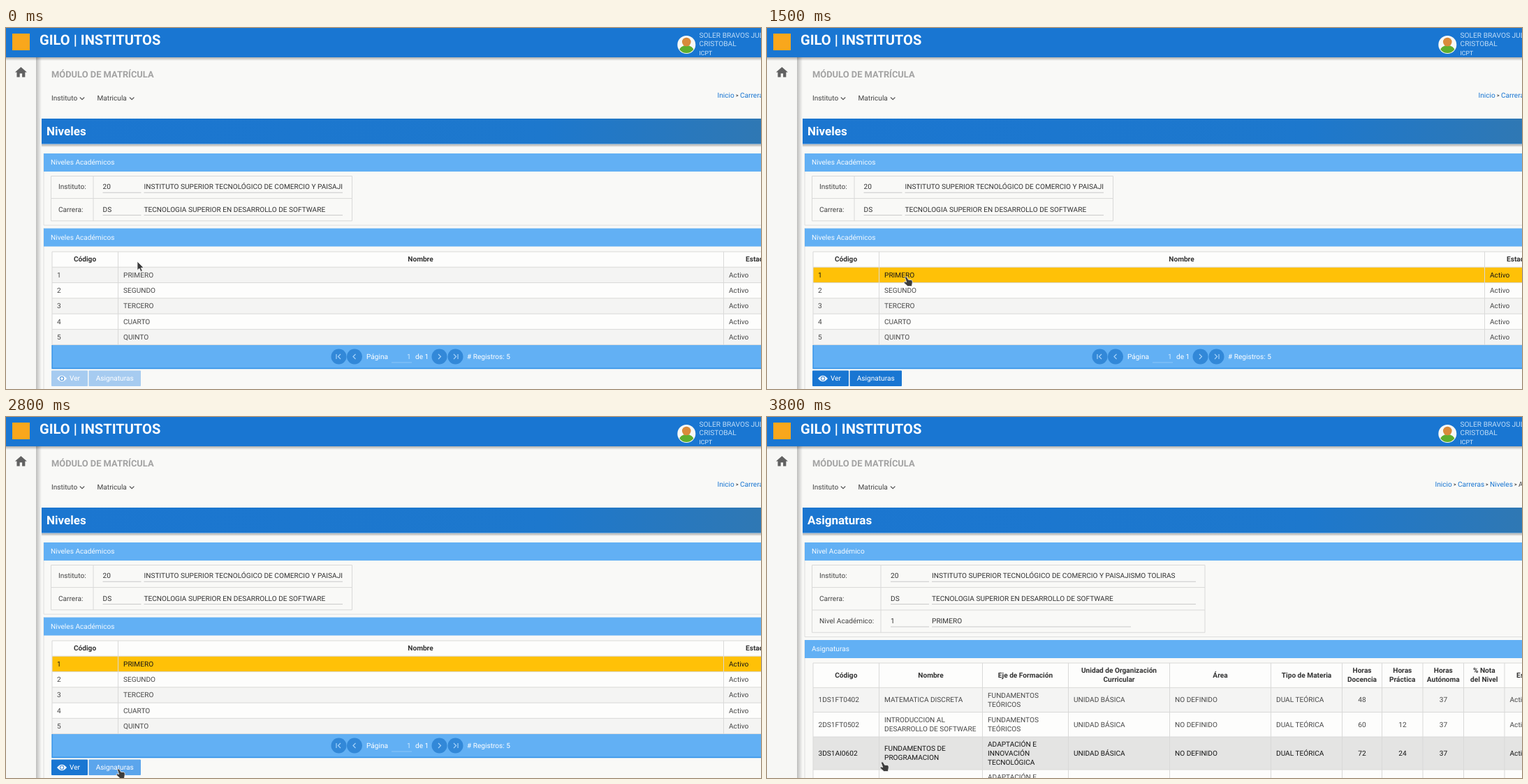
Animation, 1081 px wide and 518 px high, one loop 3.9 s. Source, as an HTML page:

```html
<!DOCTYPE html>
<html lang="es">
<head>
<meta charset="utf-8">
<title>Módulo de matrícula</title>
<style>
  html, body { margin: 0; width: 100%; height: 100%; overflow: hidden; background: #f9f9f7; }
  svg { display: block; width: 100%; height: 100%; }
  text { font-family: Roboto, Arial, sans-serif; text-rendering: geometricPrecision; white-space: pre; }
  .row text { fill: #484848; }
  .row.hover rect { fill: #e4e4e3; }
  .row.hover text, .row.picked text { fill: #151515; }
  .row.picked rect { fill: #ffc107; }
</style>
</head>
<body>
<svg id="stage" viewBox="0 0 1081 518" xmlns="http://www.w3.org/2000/svg"></svg>
<script>
const LOOP = 3900, STEP = 100, PAGE_AT = 2900, PICK_AT = 700;
const INK = '#424242', LINE = '#d9d9d8', BLUE = '#1976d2', SKY = '#62b0f4';
const SCHOOL = 'INSTITUTO SUPERIOR TECNOLÓGICO DE COMERCIO Y PAISAJISMO TOLIRAS';
const CAREER = 'TECNOLOGIA SUPERIOR EN DESARROLLO DE SOFTWARE';

// y is the middle of the capital letters
const text = (s, x, y, { size = 10.12, fill = INK, weight = 400, anchor = 'start' } = {}) =>
  `<text x="${x}" y="${y + size * 0.355}" font-size="${size}" fill="${fill}" font-weight="${weight}" text-anchor="${anchor}">${s}</text>`;
const rect = (x, y, w, h, fill, extra = '') =>
  `<rect x="${x}" y="${y}" width="${w}" height="${h}" fill="${fill}" ${extra}/>`;
const path = (d, stroke, width = 1, extra = '') =>
  `<path d="${d}" fill="none" stroke="${stroke}" stroke-width="${width}" ${extra}/>`;
const hline = (x1, x2, y, c = LINE) => path(`M${x1} ${y}H${x2}`, c);
const vline = (x, y1, y2, c = LINE) => path(`M${x} ${y1}V${y2}`, c);
const group = (id, body, extra = '') => `<g id="${id}" ${extra}>${body}</g>`;

const defs = `<defs>
  <linearGradient id="bar"><stop offset="0" stop-color="#1b76d0"/><stop offset=".7" stop-color="#1d78cd"/><stop offset="1" stop-color="#2f78b4"/></linearGradient>
  <linearGradient id="down" x2="0" y2="1"><stop offset="0" stop-opacity=".3"/><stop offset="1" stop-opacity="0"/></linearGradient>
  <linearGradient id="right"><stop offset="0" stop-opacity=".24"/><stop offset="1" stop-opacity="0"/></linearGradient>
  <clipPath id="face"><circle cx="974.3" cy="24" r="12"/></clipPath>
</defs>`;

const heading = (s, y) => rect(54, y, 1027, 26, SKY) + text(s, 64, y + 12.5, { fill: '#f4faff' });

function frameParts() {
  const chevron = x => path(`M${x} 99.5l3.2 3.2 3.2-3.2`, '#555', 1.1);
  return rect(0, 0, 1081, 518, '#f9f9f7')
    + rect(0, 42, 43, 476, '#f7f7f5') + rect(43, 42, 8, 476, 'url(#right)')
    + rect(0, 42, 1081, 5, 'url(#down)') + rect(0, 0, 1081, 42, BLUE)
    + text('GILO | INSTITUTOS', 48, 17, { size: 20.1, fill: '#fff', weight: 700 })
    + '<path transform="translate(11.2 53.4) scale(.85)" fill="#616161" d="M10 20v-6h4v6h5v-8h3L12 3 2 12h3v8z"/>'
    + text('MÓDULO DE MATRÍCULA', 65, 66.5, { size: 12.9, fill: '#a3a3a3', weight: 700 })
    + text('Instituto', 65, 100) + chevron(105.8) + text('Matricula', 130.5, 100) + chevron(177)
    + rect(51, 167, 1030, 4, 'url(#down)') + rect(51, 130, 1030, 36.5, 'url(#bar)');
}

function account() {
  const small = { size: 10.2, fill: '#bfdcf7' };
  return rect(9, 8, 25, 24, '#f9a71c')
    + '<circle cx="974.3" cy="24" r="13" fill="#f7f8f5"/><g clip-path="url(#face)">'
    + '<ellipse cx="974.3" cy="33" rx="10.5" ry="8" fill="#5fae2e"/><circle cx="974.3" cy="20" r="6.3" fill="#d98a3a"/></g>'
    + text('SOLER BRAVOS JULIO', 992.5, 10, small) + text('CRISTOBAL', 992.5, 22.8, small)
    + text('ICPT', 992.5, 35.5, { size: 8.7, fill: '#d5e8fa' });
}

function crumbs(items) {
  return items.map(([s, x, sep], i) => text(s, x, 96.5, { fill: s === 'Asignaturas' ? INK : BLUE })
    + (sep ? text('&gt;', sep, 97, { size: 7, weight: 700 }) : '')).join('');
}

// label / code / value form with thin underlines
function form(right, split, col, rows) {
  const bottom = 212 + rows.length * 32.4;
  let out = path(`M64.5 212.5H${right}V${bottom}H64.5Z`, LINE) + vline(split, 212, bottom);
  rows.forEach(([label, code, value, end], i) => {
    const y = 227.8 + i * 32.4;
    if (i) out += hline(64.5, right, 212.2 + i * 32.4);
    out += text(label, 75, y) + text(code, col, y, { fill: '#333' }) + text(value, col + 59, y, { fill: '#333' })
      + hline(col, col + 55, y + 8.4, '#c9c9c9') + hline(col + 59, end, y + 8.4, '#c9c9c9');
  });
  return out;
}

function row(y, h, odd, cells) {
  const body = cells.map(([s, x, anchor]) => {
    const lines = s.split('|');
    return lines.map((l, i) => text(l, x, y + h / 2 + (i - (lines.length - 1) / 2) * 13 - .3, { fill: '', anchor })).join('');
  }).join('');
  return `<g class="row" data-y="${y}" data-h="${h}">${rect(66, y, 1015, h, odd ? '#f4f4f3' : '#fdfdfc')}${body}</g>`;
}

function grid(cols, ys) {
  return cols.map(x => vline(x, ys[0], ys[ys.length - 1])).join('') + ys.map(y => hline(66, 1081, y)).join('');
}

const bold = { weight: 700, anchor: 'middle', fill: '#333' };

function pager() {
  const disc = (x, d) => `<circle cx="${x}" cy="471.5" r="11" fill="#3288d8"/>` + path(`M${x} 471.5${d}`, '#a5d2fa', 1.2);
  const white = { fill: '#fff' };
  return rect(66, 455, 1015, 34, SKY) + path('M66 455V488.5H1081', '#2f8fe6', 1.3)
    + disc(476.5, 'm2.5-3.5l-3.5 3.5 3.5 3.5m-6-7v7') + disc(499, 'm1.5-3.5l-3.5 3.5 3.5 3.5')
    + disc(620.5, 'm-1.5-3.5l3.5 3.5-3.5 3.5') + disc(643.5, 'm-2.5-3.5l3.5 3.5-3.5 3.5m6-7v7')
    + text('Página', 516, 471, white) + text('1', 574, 471, { fill: '#cfe7fc' }) + hline(552, 581, 480, '#8cc6f8')
    + text('de 1', 586, 471, white) + text('# Registros: 5', 660, 471, white);
}

function levels() {
  const names = ['PRIMERO', 'SEGUNDO', 'TERCERO', 'CUARTO', 'QUINTO'], h = 22.3;
  const rows = names.map((n, i) =>
    row(343.2 + i * h, h, i % 2 === 0, [[i + 1, 73], [n, 168], ['Activo', 1035]].map(c => [String(c[0]), c[1], 'start'])));
  return crumbs([['Inicio', 1018.5, 1045], ['Carreras', 1051]])
    + text('Niveles', 58, 148, { size: 17, fill: '#fff', weight: 700 })
    + path('M1081 283H54V180', '#dedede') + heading('Niveles Académicos', 180)
    + form(495.5, 125, 138.5, [['Instituto:', '20', SCHOOL.slice(0, 52), 482], ['Carrera:', 'DS', CAREER, 482]])
    + vline(54, 287, 518, '#dedede') + heading('Niveles Académicos', 287.5)
    + rect(66, 321, 1015, 22, '#fdfdfc') + rows.join('')
    + grid([66, 160.5, 1027.5], [321, ...names.map((_, i) => 343.2 + i * h), 454.7])
    + text('Código', 113, 331.5, bold) + text('Nombre', 593.5, 331.5, bold) + text('Estado', 1059, 331.5, { ...bold, anchor: 'start' })
    + pager()
    + rect(65, 491.5, 52, 22.5, BLUE, 'id="view" rx="1"') + rect(118.5, 491.5, 74.5, 22.5, BLUE, 'id="subjects" rx="1"')
    + '<path d="M73 503Q80 494.5 87 503Q80 511.500 73 503Z" fill="#fff"/>'
    + '<circle cx="80" cy="503" r="2.6" fill="#fff" stroke="#5a9bdd" stroke-width="1.3"/>'
    + text('Ver', 91, 502.5, { fill: '#fff' }) + text('Asignaturas', 155.7, 502.5, { fill: '#fff', anchor: 'middle' });
}

function subjects() {
  const cols = [66, 160.5, 308.5, 431.5, 576.5, 721.5, 823.5, 880.5, 939, 997.5, 1056];
  const heads = ['Código', 'Nombre', 'Eje de Formación', 'Unidad de Organización|Curricular', 'Área', 'Tipo de Materia',
    'Horas|Docencia', 'Horas|Práctica', 'Horas|Autónoma', '% Nota|del Nivel'];
  const base = 'FUNDAMENTOS|TEÓRICOS', adapt = 'ADAPTACIÓN E|INNOVACIÓN|TECNOLÓGICA';
  const data = [
    ['1DS1FT0402', 'MATEMATICA DISCRETA', base, '48', '', '37'],
    ['2DS1FT0502', 'INTRODUCCION AL|DESARROLLO DE SOFTWARE', base, '60', '12', '37'],
    ['3DS1AI0602', 'FUNDAMENTOS DE|PROGRAMACION', adapt, '72', '24', '37'],
    ['', '', adapt, '', '', '']];
  const ys = [388.3, 423.6, 459, 506, 553];
  const rows = data.map(([code, name, axis, a, b, c], i) => row(ys[i], ys[i + 1] - ys[i], i % 2 === 0, [
    [code, 73.500, 'start'], [name, 168, 'start'], [axis, 316, 'start'],
    ...(code ? [['UNIDAD BÁSICA', 439, 'start'], ['NO DEFINIDO', 584, 'start'], ['DUAL TEÓRICA', 729, 'start'],
      [a, 852, 'middle'], [b, 910, 'middle'], [c, 968.5, 'middle'], ['Activo', 1063.5, 'start']] : [])]));
  const titles = heads.map((s, i) => {
    const lines = s.split('|'), x = (cols[i] + cols[i + 1]) / 2;
    return lines.map((l, k) => text(l, x, 370.3 + (k - (lines.length - 1) / 2) * 13, bold)).join('');
  });
  return crumbs([['Inicio', 956.5, 983], ['Carreras', 989, 1029], ['Niveles', 1035, 1070], ['Asignaturas', 1076]])
    + text('Asignaturas', 58, 148, { size: 17, fill: '#fff', weight: 700 })
    + path('M1081 315.5H54V180', '#dedede') + heading('Nivel Académico', 180)
    + form(627, 163, 177, [['Instituto:', '20', SCHOOL, 614], ['Carrera:', 'DS', CAREER, 614], ['Nivel Académico:', '1', 'PRIMERO', 521]])
    + vline(54, 320, 518, '#dedede') + heading('Asignaturas', 320)
    + rect(66, 353, 1015, 35, '#fdfdfc') + rows.join('') + grid(cols, [353, ...ys])
    + titles.join('') + text('Estado', 1073, 370.3, { ...bold, anchor: 'start' });
}

const outline = 'fill="#3c3c3c" stroke="#f2f2f2" stroke-width=".8" stroke-linejoin="round"';
const stage = document.getElementById('stage');
stage.innerHTML = defs + frameParts() + group('account', account())
  + group('levels', levels()) + group('list', subjects())
  + group('pointer',
    `<path id="arrow" ${outline} d="M0 0V12.500L3 10L5 14.500L7.300 13.500L5.300 9.300L9 9Z"/>`
    + `<path id="hand" ${outline} d="M-.5 1.200Q.7 -1.200 2.300 .4L4.500 4.300L8.500 4.500Q10.700 5.300 10.300 8L9.300 13.500H3.300L-1.800 8.800Q-2.800 6.800 -.5 7L1.700 7.600Z"/>`);

const el = id => document.getElementById(id);
const levelRows = [...el('levels').querySelectorAll('.row')];
const listRows = [...el('list').querySelectorAll('.row')];

// pointer tip: time, x, y
const route = [[0, 188, 335], [100, 189, 337], [300, 197, 347], [500, 204, 354], [1300, 204, 354], [1500, 198, 357],
  [1600, 189, 384], [1700, 174, 428], [1800, 159, 468], [1900, 148, 497], [2000, 144, 505], [2400, 160, 505],
  [2900, 160, 505], [3100, 160, 503], [3500, 161, 499], [3800, 164, 495]];

function tipAt(t) {
  const i = route.findIndex(p => p[0] >= t);
  if (i < 1) return route[i ? route.length - 1 : 0].slice(1);
  const [t0, x0, y0] = route[i - 1], [t1, x1, y1] = route[i];
  const k = (t - t0) / (t1 - t0);
  return [x0 + (x1 - x0) * k, y0 + (y1 - y0) * k];
}

const within = (r, y) => y >= +r.dataset.y && y < +r.dataset.y + +r.dataset.h;

function draw(t) {
  const [x, y] = tipAt(t);
  const second = t >= PAGE_AT, picked = t >= PICK_AT;
  const overButton = !second && y > 491 && x > 118 && x < 193;
  el('levels').style.display = second ? 'none' : '';
  el('list').style.display = second ? '' : 'none';
  el('account').style.display = t >= PAGE_AT && t < PAGE_AT + 100 ? 'none' : '';
  let overRow = second;
  levelRows.forEach((r, i) => {
    const over = within(r, y);
    overRow = overRow || over;
    r.classList.toggle('hover', over);
    r.classList.toggle('picked', i === 0 && picked);
  });
  listRows.forEach(r => r.classList.toggle('hover', t >= 3000 && within(r, y)));
  const idle = t < PICK_AT ? '#a6cbf0' : t < PICK_AT + 100 ? '#5c9fe0' : BLUE;
  el('view').setAttribute('fill', idle);
  el('subjects').setAttribute('fill', !overButton ? idle : t < 2600 ? '#125bb0' : t < 2700 ? '#3a83d0' : '#5ba5ec');
  el('pointer').setAttribute('transform', `translate(${x} ${y})`);
  el('hand').style.display = overRow || overButton ? '' : 'none';
  el('arrow').style.display = overRow || overButton ? 'none' : '';
}

let last = -1;
const start = performance.now();
function tick(now) {
  const t = Math.floor((Math.max(0, now - start) % LOOP) / STEP) * STEP;
  if (t !== last) draw(last = t);
  requestAnimationFrame(tick);
}
draw(0);
requestAnimationFrame(tick);
</script>
</body>
</html>
```
